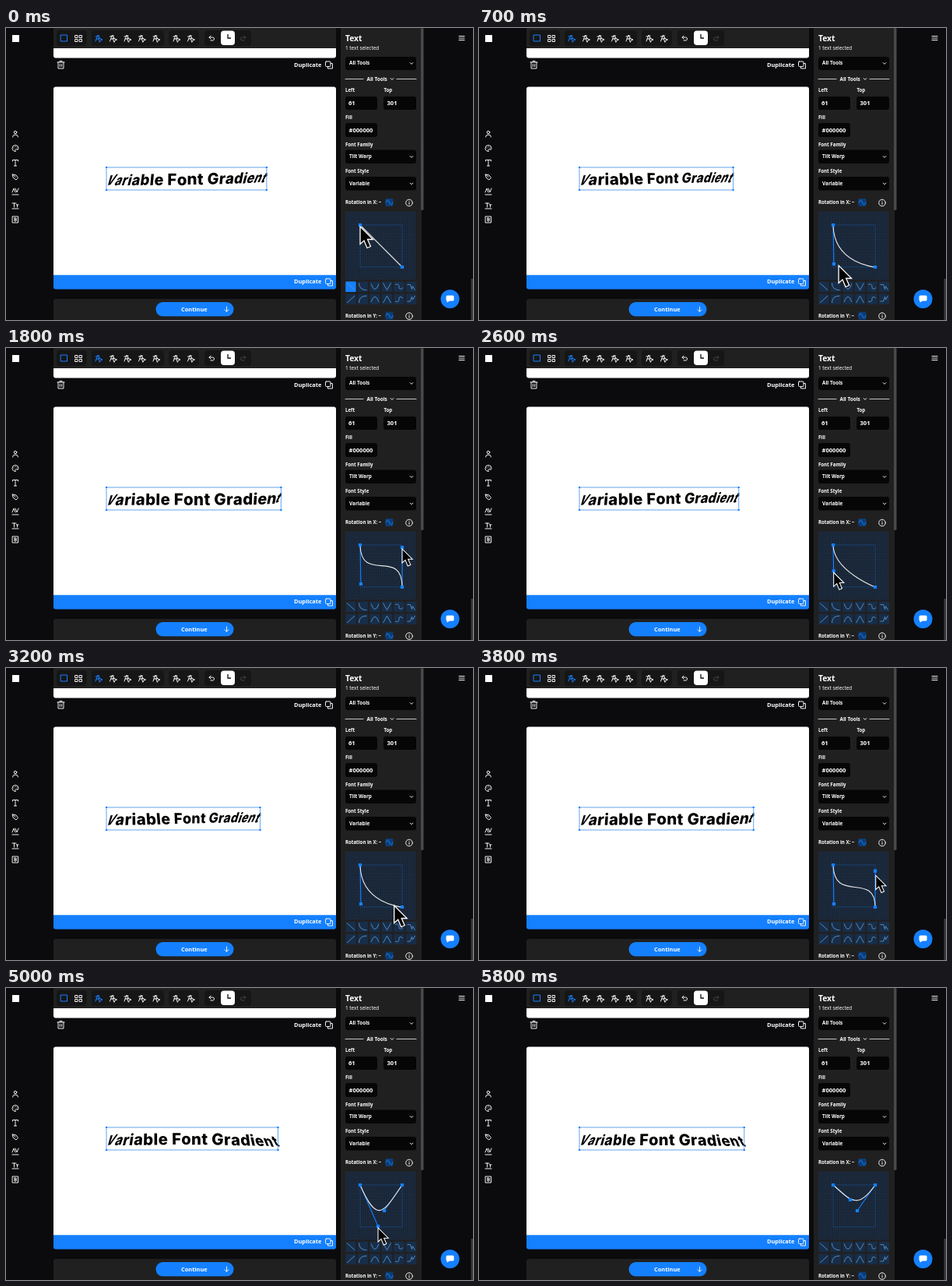
An HTML page for the animation above (5900 ms loop, 600 by 375 pixels).

```html
<!DOCTYPE html>
<html lang="en">
<head>
<meta charset="utf-8">
<title>Variable font gradient</title>
<style>
html, body { margin: 0; width: 100%; height: 100%; overflow: hidden; background: #0b0b0d; }
svg { display: block; width: 600px; height: 375px; font: 600 6.4px "Noto Sans", sans-serif; fill: #fff; }
.icon { fill: none; stroke: #eee; stroke-linejoin: round; stroke-linecap: round; }
.blue { fill: #1480ff; }
.accent { stroke: #1480ff; }
.dim { stroke: #444; }
.bar { fill: #202021; }
.group { fill: #161617; }
.field { fill: #060606; }
.label { font-size: 6.1px; }
.value { font-size: 7.6px; }
.action { font-size: 7.4px; font-weight: 700; }
.title { font-size: 10.3px; font-weight: 700; }
#word { font: 800 20.5px Inter, "Open Sans", sans-serif; fill: #000; }
</style>
</head>
<body>
<svg viewBox="0 0 600 375">
  <defs>
    <pattern id="grid" x="436" y="236" width="2.7" height="2.7" patternUnits="userSpaceOnUse">
      <path d="M0 .4H2.7M.4 0V2.7" stroke="#1b3453" stroke-width=".5"/>
    </pattern>
    <path id="warp" d="M-4 4-1-4 2 1M-3 1H0M0 0 5 2 2.500 3 1.500 5ZM-4-2 1-3"/>
    <g id="copy"><rect x="-4.5" y="-4.5" width="6.5" height="6.5" rx="1"/><path d="M-1.5 2V4.5H4.5V-2H2"/></g>
    <path id="chevron" d="M-1.8-.9 0 .9 1.8-.9"/>
    <g id="info"><circle r="4.3"/><path d="M0-.5V2M0-2.200v.1"/></g>
    <g id="wave"><rect x="-5" y="-5" width="10" height="10" rx="1.500" fill="#0d3d75"/><path class="icon accent" d="M-4.500 0q2.500-6 4.500 0t4.500 0"/></g>
  </defs>

  <!-- workspace -->
  <path d="M61 26V35.500a3 3 0 0 0 3 3H421a3 3 0 0 0 3-3V26Z"/>
  <rect class="blue" x="61" y="300" width="363" height="35.500" rx="3"/>
  <path d="M61 317.300V78.500a3 3 0 0 1 3-3H421a3 3 0 0 1 3 3V317.300Z"/>
  <rect class="bar" x="61" y="348" width="363" height="30" rx="3"/>
  <rect class="blue" x="192.500" y="352" width="100" height="18.300" rx="9"/>
  <text class="action" x="370" y="49.500">Duplicate</text>
  <text class="action" x="370" y="328.300">Duplicate</text>
  <text class="action" x="225" y="363.700">Continue</text>
  <g class="icon">
    <path d="M66 44H75M69 44V42.500H72V44M67 44V52H74V44M69.300 46.500V49.500M71.700 46.500V49.500"/>
    <use href="#copy" x="415" y="47.500"/>
    <use href="#copy" x="415" y="326.500"/>
    <path d="M283.500 358V364M281 361.800 283.500 364.300 286 361.800"/>
  </g>

  <!-- toolbar -->
  <rect x="8" y="9" width="9" height="9"/>
  <rect class="bar" x="61" width="363" height="26"/>
  <g class="group">
    <rect x="65" y="3" width="39" height="20" rx="4"/>
    <rect x="110" y="3" width="93" height="20" rx="4"/>
    <rect x="209" y="3" width="39" height="20" rx="4"/>
    <rect x="255" y="3" width="60" height="20" rx="4"/>
  </g>
  <rect x="276" y="3.500" width="18" height="18.500" rx="4"/>
  <path d="M285 8V13H289" fill="none" stroke="#111" stroke-width="1.300"/>
  <g class="icon">
    <rect class="accent" x="70.500" y="9" width="8" height="8"/>
    <path d="M89 9.500h3v3h-3ZM94.500 9.500h3v3h-3ZM89 14.500h3v3h-3ZM94.500 14.500h3v3h-3Z"/>
    <g id="tools"></g>
    <path d="M263 10 261 12 263 14M261 12H265.500a2 2 0 0 1 0 4H263"/>
    <path class="dim" d="M306 10 308 12 306 14M308 12H303.500a2 2 0 0 0 0 4H306"/>
    <path d="M582 10.500H589M582 13H589M582 15.500H589"/>
  </g>

  <!-- left rail -->
  <g class="icon">
    <circle cx="12" cy="134" r="1.800"/><path d="M8.500 140Q8.500 137 12 137T15.500 140"/>
    <path d="M12 158.500a4 4 0 1 1 4-4Q16 157 13.500 156T12 158.500M10 154h.1M12 152.500h.1M14 154h.1"/>
    <path d="M8.500 171V169.500H15.500V171M12 169.500V177M10.500 177H13.500"/>
    <path d="M8.500 188 13 189 15.500 192.500 13 195 9.500 192.500ZM8.500 188 12 191.500"/>
    <path d="M8 211 10 206 12 211M12 206 14 211 16 206M8 214H16"/>
    <path d="M8 225H13M10.500 225V230M13 227H16M14.500 227V230M8 232H16"/>
    <path d="M8.500 242H15.500V250H8.500ZM11 244V248H12.500a1 1 0 0 0 0-2 1 1 0 0 0 0-2H11M11 246H12.500"/>
  </g>

  <!-- inspector -->
  <rect class="bar" x="430" width="104" height="375"/>
  <rect x="533" width="3.500" height="234" rx="1.500" fill="#4a4a4b"/>
  <rect x="597.500" y="322" width="2.500" height="53" fill="#3a3a3a"/>
  <g class="field">
    <rect x="436" y="37" width="91" height="17" rx="3"/>
    <rect x="436" y="88" width="41" height="17" rx="3"/>
    <rect x="485" y="88" width="42" height="17" rx="3"/>
    <rect x="436" y="122" width="41" height="18" rx="3"/>
    <rect x="436" y="156.500" width="91" height="17.500" rx="3"/>
    <rect x="436" y="191" width="91" height="17.500" rx="3"/>
  </g>
  <g class="icon">
    <use href="#chevron" x="521" y="45.500"/>
    <use href="#chevron" x="496" y="65.500"/>
    <use href="#chevron" x="521" y="165.500"/>
    <use href="#chevron" x="521" y="200"/>
    <path d="M436 65.500H459M502 65.500H527" stroke-width=".8"/>
    <use href="#info" x="518" y="224.500"/>
    <use href="#info" x="518" y="370"/>
  </g>
  <use href="#wave" x="492.500" y="224"/>
  <use href="#wave" x="492.500" y="369.500"/>
  <text class="title" x="436" y="17">Text</text>
  <text x="436" y="27.500" font-weight="500">1 text selected</text>
  <text x="441" y="47.300">All Tools</text>
  <text x="463.500" y="67.500">All Tools</text>
  <text class="label" x="436" y="82.300">Left</text>
  <text class="label" x="485.500" y="82.300">Top</text>
  <text class="value" x="440" y="99">61</text>
  <text class="value" x="489.500" y="99">301</text>
  <text class="label" x="436" y="117.300">Fill</text>
  <text class="value" x="440.500" y="133.500">#000000</text>
  <text class="label" x="436" y="151.700">Font Family</text>
  <text x="441" y="167.300">Tilt Warp</text>
  <text class="label" x="436" y="186.300">Font Style</text>
  <text x="441" y="201.800">Variable</text>
  <text class="label" x="436" y="226.300">Rotation in X: ~</text>
  <text class="label" x="436" y="372">Rotation in Y: ~</text>

  <rect x="436" y="236" width="90" height="87" fill="#1a222e"/>
  <rect x="436" y="236" width="90" height="87" fill="url(#grid)"/>
  <rect x="455" y="253" width="54" height="54" fill="none" stroke="#164a88" stroke-width=".7"/>
  <g id="presets"></g>

  <circle class="blue" cx="570.500" cy="348" r="12"/>
  <path d="M567 343.500h7a1.500 1.500 0 0 1 1.500 1.500v4a1.500 1.500 0 0 1-1.500 1.500h-4l-3.500 2v-2a1.500 1.500 0 0 1-1-1.500v-4a1.500 1.500 0 0 1 1.500-1.500Z"/>

  <!-- moving parts -->
  <g id="word"></g>
  <path id="frame" fill="none" stroke="#3b8fe8" stroke-width=".8"/>
  <path id="corners" class="blue"/>
  <path id="levers" fill="none" stroke="#1480ff" stroke-width="1.100"/>
  <path id="curve" fill="none" stroke="#e6e6e6" stroke-width="1.100"/>
  <path id="knobs" class="blue"/>
  <path id="cursor" d="M0 0V22.500L5 18 9 27.500 13.500 25.500 9.500 16.500H16.500Z" stroke="#fff" stroke-width="1.300" fill="#000"/>
</svg>
<script>
const $ = id => document.getElementById(id);
const set = (id, name, value) => $(id).setAttribute(name, value);
const square = ([x, y], r) => `M${x - r} ${y - r}h${2 * r}v${2 * r}h${-2 * r}Z`;
const ramp = (t, from, to) => Math.min(1, Math.max(0, (t - from) / (to - from)));
const mix = (p, q, k) => p.map((v, i) => v + (q[i] - v) * k);

$('tools').innerHTML = [...Array(7).keys()].map(i =>
  `<use href="#warp" x="${119 + 18.5 * i + (i > 4 ? 7.5 : 0)}" y="13" class="${i ? '' : 'accent'}"/>`).join('');

const shapes = ['M0 0 10 9', 'M0 0Q0 9 10 9', 'M0 1Q5 15 10 1', 'M0 0 5 9 10 0',
  'M0 2Q5 0 5 5T10 6', 'M0 2H4L6 8 7 4 10 9'];
$('presets').innerHTML = [1, -1].map((flip, row) => shapes.map((d, i) =>
  `<g transform="translate(${436.2 + 15.5 * i} ${325.5 + 16 * row})">
    <rect width="13.500" height="13.500" rx="1" fill="#182d47"/>
    <path d="${d}" transform="translate(1.800 ${row ? 11.5 : 2}) scale(1 ${flip})"
      fill="none" stroke="#5a93cc" stroke-width=".9"/></g>`).join('')).join('');
const linear = $('presets').querySelector('rect');

const phrase = [...'Variable Font Gradient'];
const pen = document.createElement('canvas').getContext('2d');
pen.font = '800 20.5px Inter, "Open Sans", sans-serif';
const advances = phrase.map(c => pen.measureText(c).width + .3);
$('word').innerHTML = phrase.map(c => `<text y="7">${c}</text>`).join('');
const letters = [...$('word').children];

const start = [455, 253], corner = [509, 307];

// Pull the first lever down, cross over, pull the second one up, go back.
function pullBoth(t) {
  const down = ramp(t, 100, 550), across = ramp(t, 650, 1150);
  const up = ramp(t, 1300, 1630), back = ramp(t, 1800, 2150);
  const a = mix(start, [456, 303], down), b = mix(corner, [509, 256], up);
  const cursor = mix(mix(mix(a, [517, 303], across), b, up), start, back);
  const pressed = down > 0 && !across || up > 0 && !back;
  return { a, b, end: corner, cursor, pressed };
}

// On an arch, swing the first lever out, lift it and leave downwards.
function swingArch(t) {
  const a = mix(mix([464, 290], [478, 306], ramp(t, 0, 600)), [477, 272], ramp(t, 800, 1200));
  const leave = ramp(t, 1200, 1400);
  return { a, b: [486, 286], end: [509, 253], cursor: mix(a, [500, 390], leave), pressed: !leave };
}

const bezier = (p, q, r, s, t) => {
  const u = 1 - t;
  return p * u ** 3 + 3 * q * u * u * t + 3 * r * u * t * t + s * t ** 3;
};

function draw(now) {
  const t = Math.floor(now % 5900 / 100) * 100;
  const { a, b, end, cursor, pressed } = t < 4400 ? pullBoth(t % 2200) : swingArch(t - 4400);

  // Height of the curve at a share of its width, from 1 at the top to 0.
  const level = share => {
    let lo = 0, hi = 1;
    for (let i = 0; i < 18; i++) {
      const mid = (lo + hi) / 2;
      if (bezier(455, a[0], b[0], 509, mid) < 455 + 54 * share) lo = mid; else hi = mid;
    }
    return (307 - bezier(253, a[1], b[1], end[1], lo)) / 54;
  };

  let x = 130.5;
  letters.forEach((el, i) => {
    const share = i / (letters.length - 1);
    const tilt = 2 * level(share) - 1, turn = 1 - 2 * share;
    const lean = tilt * turn;
    const squeeze = 1 - .26 * tilt * tilt - .08 * lean;
    el.setAttribute('transform', `translate(${x} ${194.5 + 1.8 * tilt})
      skewY(${-10 * lean}) skewX(${-30 * lean}) scale(${squeeze} ${1 - .2 * tilt * tilt})`);
    x += advances[i] * squeeze;
  });

  set('frame', 'd', `M129 179H${x}V208H129Z`);
  set('corners', 'd', [129, x].map(h => square([h, 179], 1.1) + square([h, 208], 1.1)).join(''));
  set('levers', 'd', `M${start}L${a}M${end}L${b}`);
  set('curve', 'd', `M${start}C${a} ${b} ${end}`);
  set('knobs', 'd', [start, end, a, b].map(p => square(p, 2.1)).join(''));
  set('cursor', 'transform', `translate(${cursor[0]} ${cursor[1] + 2}) scale(${pressed ? .8 : 1})`);
  linear.setAttribute('fill', a[1] === start[1] ? '#1480ff' : '#182d47');
}

const begin = performance.now();
(function tick() {
  draw(performance.now() - begin);
  requestAnimationFrame(tick);
})();
</script>
</body>
</html>
```
